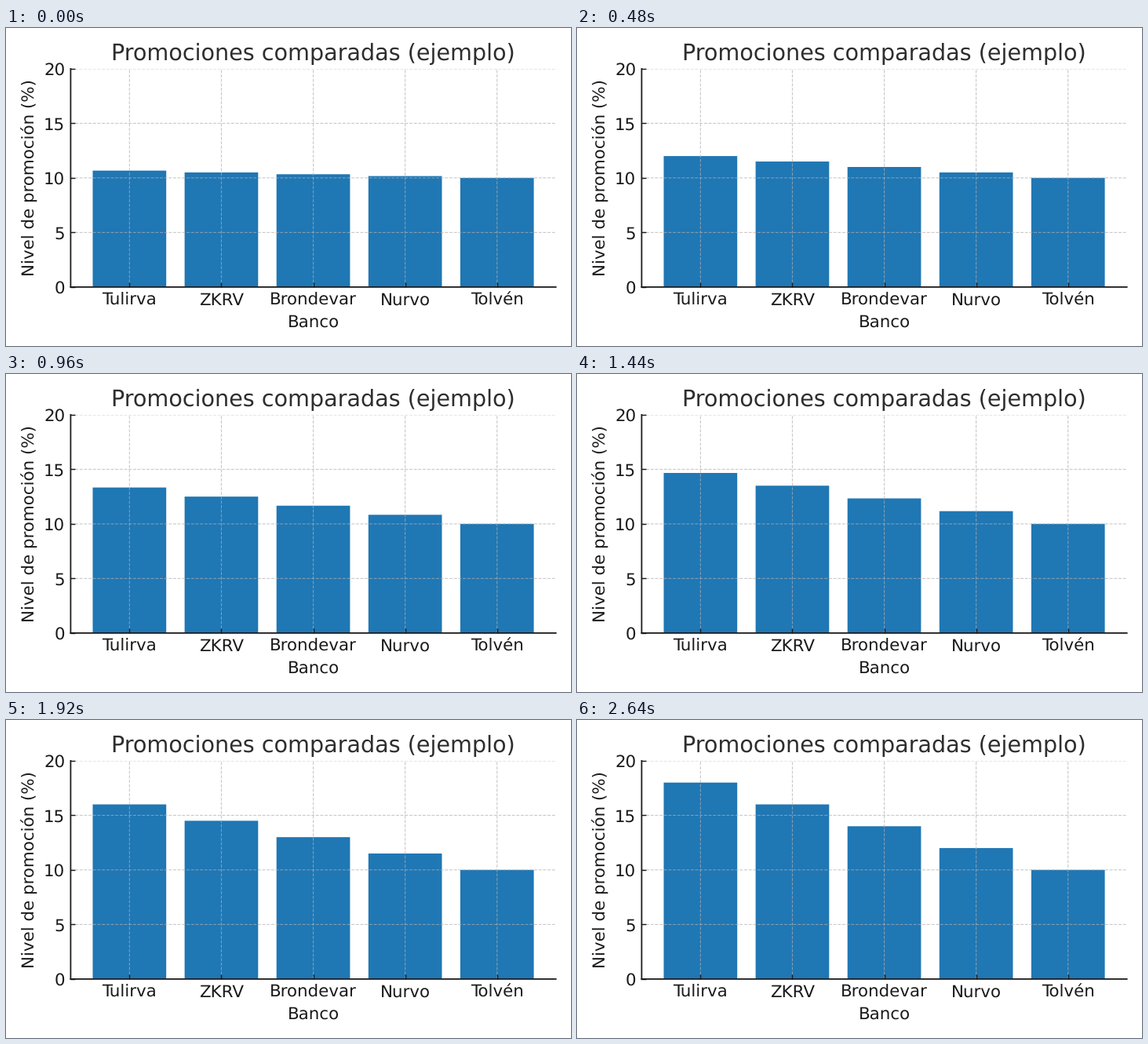
These frames come from a looping animation (720 by 405 pixels, 2880 ms). A matplotlib script:

```python
import matplotlib.pyplot as plt
import numpy as np
from matplotlib.animation import FuncAnimation

W, H, DPI = 720, 405, 72
FRAMES, INTERVAL = 12, 240
S = 25 / 14  # pixels per layout point

INK = "#1a1a1a"
plt.rcParams.update({
    "font.family": "DejaVu Sans",
    "font.size": 10 * S,
    "text.hinting": "none",
})

banks = ["Tulirva", "ZKRV", "Brondevar", "Nurvo", "Tolvén"]
start = np.full(len(banks), 10.0)
final = np.array([18.0, 16.0, 14.0, 12.0, 10.0])

fig, ax = plt.subplots(figsize=(W / DPI, H / DPI), dpi=DPI, facecolor="white")
fig.subplots_adjust(left=82.4 / W, right=700.7 / W,
                    bottom=1 - 329.9 / H, top=1 - 51.9 / H)

bars = ax.bar(range(len(banks)), start, width=0.8, color="#1f77b4")
ax.set_xlim(-0.64, len(banks) - 0.36)
ax.set_ylim(0, 20)
ax.set_xticks(range(len(banks)), banks)
ax.set_yticks(range(0, 21, 5))

ax.set_title("Promociones comparadas (ejemplo)", fontsize=16 * S,
             color="#2e2e2e", pad=6 * S)
ax.set_xlabel("Banco", fontsize=12 * S, color=INK, labelpad=4 * S)
ax.set_ylabel("Nivel de promoción (%)", fontsize=12 * S, color=INK,
              labelpad=4 * S)

ax.tick_params(direction="in", length=3.5 * S, width=0.8 * S, pad=4 * S,
               labelsize=12 * S, color=INK, labelcolor=INK)
ax.grid(True, linestyle="--", linewidth=0.6 * S, color="#b0b0b0", alpha=0.7)
ax.set_axisbelow("line")

ax.spines[["top", "right"]].set_visible(False)
for side in ("left", "bottom"):
    ax.spines[side].set(linewidth=1.0 * S, color=INK)

# Keep edges at their true subpixel positions
for artist in ax.findobj():
    artist.set_snap(False)


def update(i):
    heights = start + (final - start) * (i + 1) / FRAMES
    for bar, height in zip(bars, heights):
        bar.set_height(height)
    return bars.patches


anim = FuncAnimation(fig, update, frames=FRAMES, interval=INTERVAL,
                     repeat=True, repeat_delay=0, blit=False)
plt.show()
```
